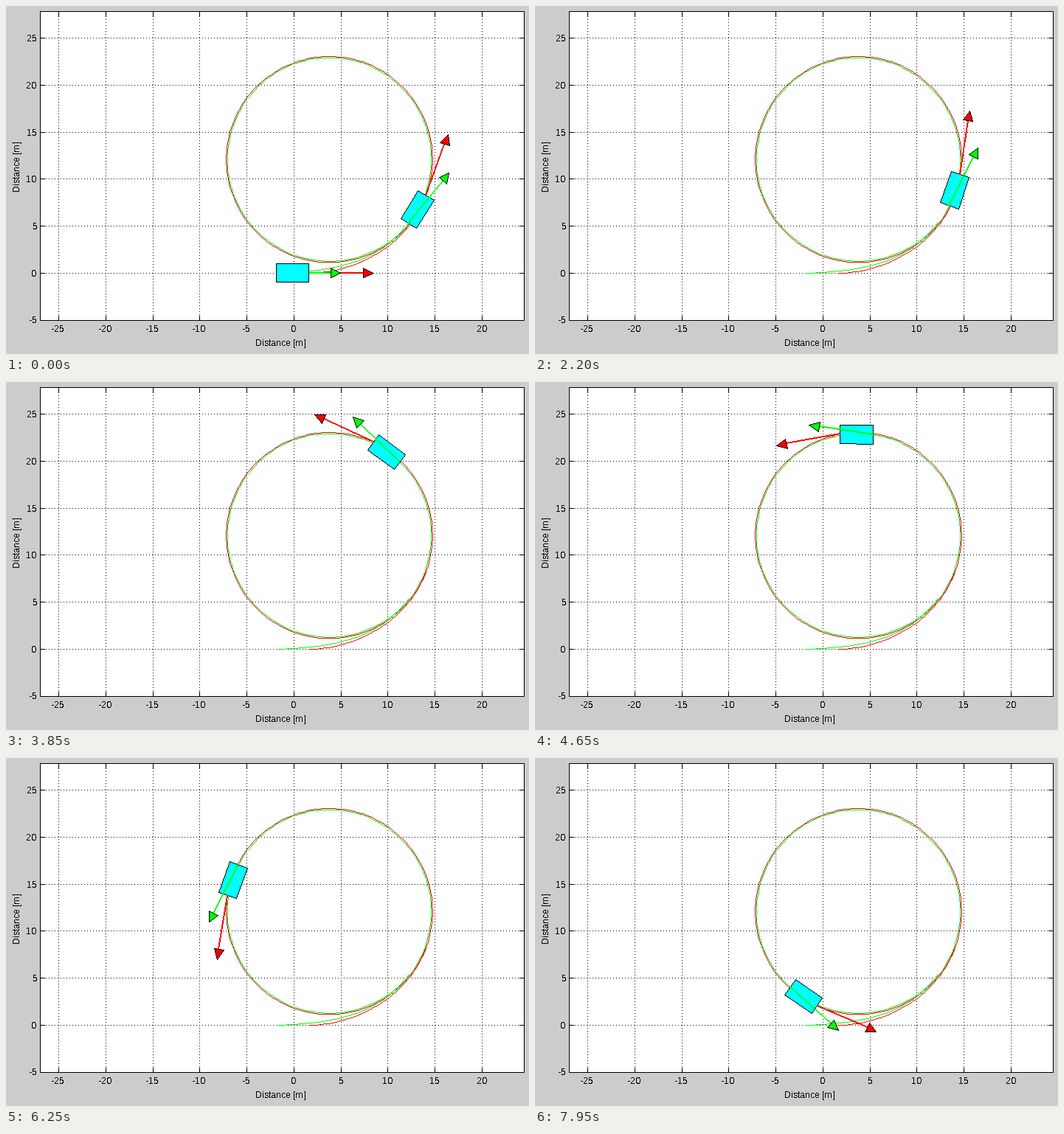
These frames come from a looping animation (709x472 px, 8000 ms). A matplotlib script:

```python
import numpy as np
import matplotlib.pyplot as plt
from matplotlib.animation import FuncAnimation
from matplotlib.collections import PolyCollection
from matplotlib.patches import Polygon, Rectangle

W, H, DPI = 709, 472, 64
PX = 72 / DPI                      # points per pixel
FRAMES, INTERVAL = 160, 50
X0, Y0, SCALE = 390.3, 362.2, 12.74
LEFT, TOP, RIGHT, BOTTOM = 46, 7, 702, 426

RED, GREEN, CYAN = "#ff0000", "#00ff00", "#00ffff"

# Single-track vehicle model
MASS, INERTIA, SPEED = 1300, 12000, 8.333
FRONT, REAR, HALF_W = 1.615, 1.885, 1.0
STIFF, STEER = 30000, 0.3467
DT, SUB, STEPS = 0.05, 25, 200

CELL = np.array([[0.1, 0.1], [0.9, 0.1], [0.9, 0.9], [0.1, 0.9]])


def trace(points, closed=False, width=1, step=1):
    """Crisp pixel line through the points, as one small square per pixel."""
    p = np.floor(points).astype(int)
    if closed:
        p = np.vstack((p, p[:1]))
    parts = [p[:1]]
    for a, b in zip(p[:-1], p[1:]):
        d = np.abs(b - a)
        n = max(d.max(), 1)
        t = np.arange(0, n + 1, step)[:, None] / n
        line = np.floor(a + t * (b - a) + 0.5).astype(int)
        side = np.array([0, 1]) if d[0] >= d[1] else np.array([1, 0])
        parts += [line - k * side for k in range(width)]
    cells = np.unique(np.vstack(parts), axis=0)
    return cells[:, None, :] + CELL


def pixels(ax, color, z, cells=()):
    art = PolyCollection(cells, facecolors=color, edgecolors="none",
                         antialiaseds=False, zorder=z)
    art.set_snap(False)
    return ax.add_collection(art, autolim=False)


def simulate():
    """Rows of x, y, heading, yaw rate, slip; the steering step comes after one sample."""
    x = y = psi = rate = slip = 0.0
    rows = [(x, y, psi, rate, slip)]
    h = DT / SUB
    for step in range(STEPS):
        steer = STEER if step else 0.0
        for _ in range(SUB):
            f_front = STIFF * (steer - slip - FRONT * rate / SPEED)
            f_rear = STIFF * (REAR * rate / SPEED - slip)
            d_slip = (f_front + f_rear) / (MASS * SPEED) - rate
            d_rate = (FRONT * f_front - REAR * f_rear) / INERTIA
            course = psi + slip + h * (rate + d_slip) / 2
            x += h * SPEED * np.cos(course)
            y += h * SPEED * np.sin(course)
            psi += h * (rate + h * d_rate / 2)
            slip += h * d_slip
            rate += h * d_rate
        rows.append((x, y, psi, rate, slip))
    return np.array(rows)


def to_px(x, y):
    return np.column_stack((X0 + SCALE * np.asarray(x), Y0 - SCALE * np.asarray(y)))


def axle(rows, dist):
    """Pixel track of a point on the car's long axis."""
    x, y, psi = rows[:, 0], rows[:, 1], rows[:, 2]
    return to_px(x + dist * np.cos(psi), y + dist * np.sin(psi))


def course_at(row, dist):
    _, _, psi, rate, slip = row
    return psi + np.arctan2(SPEED * np.sin(slip) + dist * rate, SPEED * np.cos(slip))


class Outlined:
    """Filled polygon with a one-pixel black edge."""

    def __init__(self, ax, color, z):
        self.fill = ax.add_patch(Polygon(np.zeros((3, 2)), fc=color, ec="none",
                                         zorder=z, snap=False))
        self.edge = pixels(ax, "k", z + 0.1)

    def place(self, corners):
        self.fill.set_xy(np.floor(corners) + 0.5)
        self.edge.set_verts(trace(corners, closed=True))

    def set_z(self, z):
        self.fill.set_zorder(z)
        self.edge.set_zorder(z + 0.1)

    def show(self, on):
        self.fill.set_visible(on)
        self.edge.set_visible(on)


class Arrow:
    LENGTH, HEAD, HALF = 87.5, 13.5, 6.6

    def __init__(self, ax, color, z):
        self.shaft = pixels(ax, color, z)
        self.head = Outlined(ax, color, z + 0.1)

    def place(self, start, angle):
        along = np.array([np.cos(angle), -np.sin(angle)])
        side = self.HALF * np.array([-along[1], along[0]])
        tip = start + self.LENGTH * along
        base = tip - self.HEAD * along
        self.shaft.set_verts(trace(np.array([start, base]), width=2))
        self.head.place(np.array([tip, base + side, base - side]))

    def show(self, on):
        self.shaft.set_visible(on)
        self.head.show(on)


class Car:
    def __init__(self, ax):
        self.body = Outlined(ax, CYAN, 4)
        self.red = Arrow(ax, RED, 5)
        self.green = Arrow(ax, GREEN, 6)

    def place(self, row, body_z=4):
        x, y, psi = row[:3]
        lon = np.array([FRONT, FRONT, -REAR, -REAR])
        lat = HALF_W * np.array([1, -1, -1, 1])
        c, s = np.cos(psi), np.sin(psi)
        self.body.place(to_px(x + lon * c - lat * s, y + lon * s + lat * c))
        self.body.set_z(body_z)
        for arrow, dist in ((self.red, FRONT), (self.green, -REAR)):
            arrow.place(axle(row[None], dist)[0], course_at(row, dist))

    def show(self, on):
        for part in (self.body, self.red, self.green):
            part.show(on)


def draw_axes(ax):
    ax.add_patch(Rectangle((LEFT, TOP), RIGHT - LEFT, BOTTOM - TOP, fc="w", ec="none"))
    frame = [(LEFT, TOP), (RIGHT, TOP), (RIGHT, BOTTOM), (LEFT, BOTTOM)]
    cells = [trace(frame, closed=True)]
    tick = 6
    for v in range(-25, 25, 5):
        x = int(X0 + v * SCALE)
        cells += [trace([(x, BOTTOM), (x, TOP)], step=4),
                  trace([(x, BOTTOM - tick), (x, BOTTOM)]),
                  trace([(x, TOP), (x, TOP + tick)])]
        ax.text(x - (1 if v < 0 else 0), 442, str(v), ha="center")
    for v in range(-5, 30, 5):
        y = int(Y0 - v * SCALE)
        if v > -5:
            cells += [trace([(LEFT, y), (RIGHT, y)], step=4),
                      trace([(LEFT, y), (LEFT + tick, y)]),
                      trace([(RIGHT - tick, y), (RIGHT, y)])]
        ax.text(41.5, y + 5, str(v), ha="right")
    pixels(ax, "k", 2, np.concatenate(cells))
    ax.text(372.5, 461, "Distance [m]", ha="center")
    ax.text(22, 218, "Distance [m]", rotation=90, ha="right", va="center")


plt.rcParams.update({
    "font.family": "Liberation Sans",
    "font.size": 12 * PX,
    "text.antialiased": False,
    "text.hinting_factor": 1,
    "toolbar": "None",
})
fig = plt.figure(figsize=(W / DPI, H / DPI), dpi=DPI, facecolor="#cccccc")
ax = fig.add_axes([0, 0, 1, 1])
ax.set_xlim(0, W)
ax.set_ylim(H, 0)
ax.axis("off")
draw_axes(ax)

states = simulate()
for dist, color in ((FRONT, RED), (-REAR, GREEN)):
    pixels(ax, color, 3, trace(axle(states, dist)))

car, last_car = Car(ax), Car(ax)
last_car.place(states[-1])


def update(i):
    # The opening picture also holds the car at the end of its run.
    car.place(states[max(i - 1, 0)], body_z=8 if i == 0 else 4)
    last_car.show(i == 0)
    return []


anim = FuncAnimation(fig, update, frames=FRAMES, interval=INTERVAL,
                     init_func=lambda: update(0), repeat=True, repeat_delay=0, blit=False)
plt.show()
```
